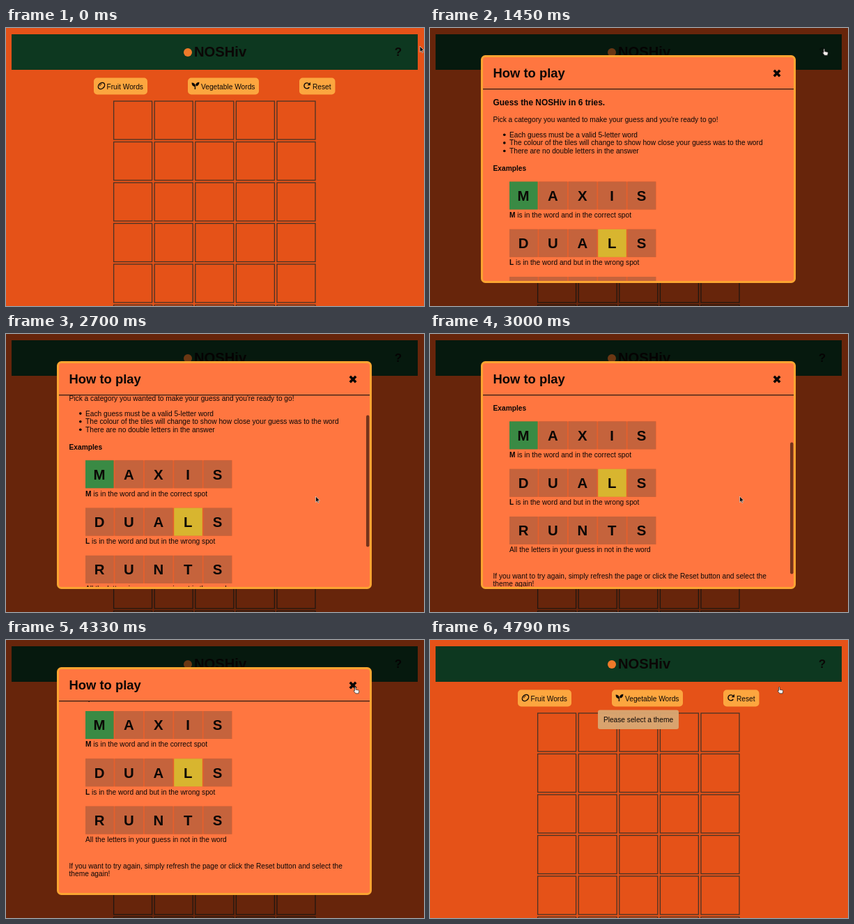
These frames come from a looping animation (600x399 px, 4.85 s). An HTML page:

```html
<!DOCTYPE html>
<html lang="en">
<head>
<meta charset="utf-8">
<title>Word game: how to play</title>
<style>
  html, body { margin: 0; width: 100%; height: 100%; overflow: hidden; background: #e55218; }
  svg { display: block; }
  text { font: 10.2px "Liberation Sans", Arial, sans-serif; fill: #0b0706; }
  .b { font-weight: bold; }
  .mid { text-anchor: middle; }
  .icon { fill: none; stroke: #0b0706; stroke-width: 1.4; }
</style>
</head>
<body>
<svg width="600" height="399" viewBox="0 0 600 399">
  <rect width="600" height="399" fill="#e55218"/>
  <rect x="8" y="9" width="583" height="51" fill="#0d3820"/>
  <circle cx="261" cy="35" r="6" fill="#ee7a2a"/>
  <text class="b" x="270" y="41" style="font-size:20.2px">NOSHiv</text>
  <text class="b mid" id="help" x="563" y="40" style="font-size:17px">?</text>

  <g fill="#fca63f">
    <rect x="126" y="71.5" width="77" height="24" rx="5"/>
    <rect x="261" y="71.5" width="102" height="24" rx="5"/>
    <rect x="421" y="71.5" width="51.5" height="24" rx="5"/>
  </g>
  <ellipse class="icon" cx="137" cy="83" rx="5.2" ry="3.9" transform="rotate(-45 137 83)"/>
  <path class="icon" d="M134.5 83.5q.4-2.6 3-3" style="stroke-width:.9"/>
  <path d="M266.5 78.5q5 0 5.6 5v4.500h-1.400v-4q-4-.5-4.200-5.500zM277.500 77.800q-4.500 0-5.500 4 .8.800 1 1.800 4.300-.6 4.500-5.800z" fill="#0b0706"/>
  <path class="icon" d="M435 80.300a4 4 0 1 0 .3 4.700"/>
  <path d="M437 77.800v4.500h-4.500z" fill="#0b0706"/>
  <text x="144.500" y="87.500">Fruit Words</text>
  <text x="280" y="87.500">Vegetable Words</text>
  <text x="440" y="87.500">Reset</text>

  <g id="board" fill="none" stroke="#4a3326" stroke-width="1.300"></g>

  <g id="toast">
    <rect x="241" y="100.500" width="116" height="27.500" rx="3" fill="#d9a873" fill-opacity=".95"/>
    <text class="mid" x="299" y="118">Please select a theme</text>
  </g>

  <rect id="shade" width="600" height="399"/>

  <g id="dialog">
    <rect x="74.500" y="40.500" width="449" height="324" rx="5" fill="#ff7640" stroke="#fba431" stroke-width="3"/>
    <text class="b" x="90.500" y="71.300" style="font-size:18.400px">How to play</text>
    <path d="M493.800 60.800l8.400 8.400m0-8.400l-8.400 8.400" stroke="#0b0706" stroke-width="3.600"/>
    <path d="M76 87.700h446" stroke="#2a1a12" stroke-width="1.300"/>
    <svg x="76" y="88.300" width="446" height="274.700" viewBox="76 88.300 446 274.700">
      <g id="content">
        <text class="b" x="90.500" y="110.500" style="font-size:11.900px">Guess the NOSHiv in 6 tries.</text>
        <text x="90.500" y="134.700">Pick a category you wanted to make your guess and you're ready to go!</text>
        <g id="rules"></g>
        <text class="b" x="90.500" y="205">Examples</text>
        <g id="examples"></g>
        <text x="90.500" y="446">If you want to try again, simply refresh the page or click the Reset button and select the</text>
        <text x="90.500" y="457.500">theme again!</text>
      </g>
      <rect id="thumb" x="517" width="4.500" height="189" rx="2.200" fill="#74341c"/>
    </svg>
  </g>

  <g id="cursor" stroke-linejoin="round">
    <path id="arrow" d="M0 0v8.500l2-1.700 1.400 2.800 1.300-.6-1.300-2.800 2.600-.2z" fill="#111" stroke="#e8d8d0" stroke-width=".7"/>
    <path id="hand" d="M0 .8q.8-1 1.600 0v3.400l4 .8q.9.400.7 1.500l-.7 3.300h-4.200l-3-3.800q.2-1 1.600-.2z" fill="#f4f0ee" stroke="#222" stroke-width=".7"/>
  </g>
</svg>

<script>
const $ = id => document.getElementById(id);
const LOOP = 4850;

for (let i = 0; i < 30; i++) {
  const x = 154.6 + i % 5 * 58.6, y = 105 + Math.floor(i / 5) * 58.5;
  $('board').innerHTML += `<rect x="${x}" y="${y}" width="55" height="55"/>`;
}

['Each guess must be a valid 5-letter word',
 'The colour of the tiles will change to show how close your guess was to the word',
 'There are no double letters in the answer'].forEach((rule, i) => {
  const y = 156.7 + i * 11.6;
  $('rules').innerHTML += `<circle cx="106.800" cy="${y - 3.4}" r="1.800"/><text x="114" y="${y}">${rule}</text>`;
});

const examples = [
  ['MAXIS', 0, '#3a8a44', '<tspan class="b">M</tspan> is in the word and in the correct spot'],
  ['DUALS', 3, '#d8b52f', '<tspan class="b">L</tspan> is in the word and but in the wrong spot'],
  ['RUNTS', -1, '', 'All the letters in your guess in not in the word']
];
examples.forEach(([word, hit, color, note], row) => {
  const y = 220.5 + row * 68.3;
  let out = `<rect x="114" y="${y}" width="210.500" height="40" fill="#e5602c"/>`;
  [...word].forEach((letter, i) => {
    const x = 114 + i * 42.4;
    out += `<rect x="${x}" y="${y}" width="40.600" height="40" fill="${i === hit ? color : '#c5633c'}"/>
      <text class="b mid" x="${x + 20}" y="${y + 27.3}" style="font-size:20.400px">${letter}</text>`;
  });
  $('examples').innerHTML += out + `<text x="114" y="${y + 51.300}">${note}</text>`;
});

// Each key is [time, value, value...]
const scrollKeys = [[2480, 0], [2700, 39], [3000, 95], [3330, 118.5]];
const cursorKeys = [
  [30, 594, 26], [200, 587, 48], [450, 565, 29.5], [1450, 565, 29.5], [1910, 505, 67],
  [2000, 505, 67], [2330, 444.5, 233], [3480, 444.5, 233], [3640, 490.5, 106],
  [4000, 492, 97], [4180, 500.5, 67]
];
const clamp = v => Math.max(0, Math.min(1, v));
const linear = v => v;
const smooth = v => v * v * (3 - 2 * v);

function at(keys, t, curve) {
  let i = 0;
  while (i < keys.length - 2 && t > keys[i + 1][0]) i++;
  const [a, b] = [keys[i], keys[i + 1]];
  const k = curve(clamp((t - a[0]) / (b[0] - a[0])));
  return a.slice(1).map((v, j) => v + (b[j + 1] - v) * k);
}

// The CSS "ease" curve, solved by bisection
function ease(x) {
  if (x <= 0 || x >= 1) return clamp(x);
  let lo = 0, hi = 1, s;
  for (let i = 0; i < 20; i++) {
    s = (lo + hi) / 2;
    if (.75 * s * (1 - s) + s ** 3 < x) lo = s; else hi = s;
  }
  return .3 * s * (1 - s) ** 2 + 3 * s * s * (1 - s) + s ** 3;
}

const show = (id, visible) => $(id).setAttribute('visibility', visible ? 'visible' : 'hidden');

function draw(t) {
  const open = ease((t - 640) / 402) - ease((t - 4518) / 272);
  $('shade').setAttribute('opacity', .55 * open);
  $('dialog').setAttribute('transform', `translate(299 202.500) scale(${open}) translate(-299 -202.500)`);
  show('dialog', open > .002);
  show('toast', t >= 4560);

  const [scroll] = at(scrollKeys, t, linear);
  $('content').setAttribute('transform', `translate(0 ${-scroll})`);
  $('thumb').setAttribute('y', 89 + scroll * .7);
  $('thumb').setAttribute('opacity', t < 2480 ? 0 : 1 - clamp((t - 4030) / 150));

  const [x, y] = at(cursorKeys, t, smooth);
  const overHelp = t >= 400 && t < 1600;
  const hand = overHelp || (t >= 1850 && t < 2040) || t >= 4130;
  $('cursor').setAttribute('transform', `translate(${x} ${y})`);
  show('hand', hand);
  show('arrow', !hand);
  $('help').setAttribute('opacity', overHelp ? .35 : 1);
}

const start = performance.now();
function tick() {
  draw((performance.now() - start) % LOOP);
  requestAnimationFrame(tick);
}
tick();
</script>
</body>
</html>
```
